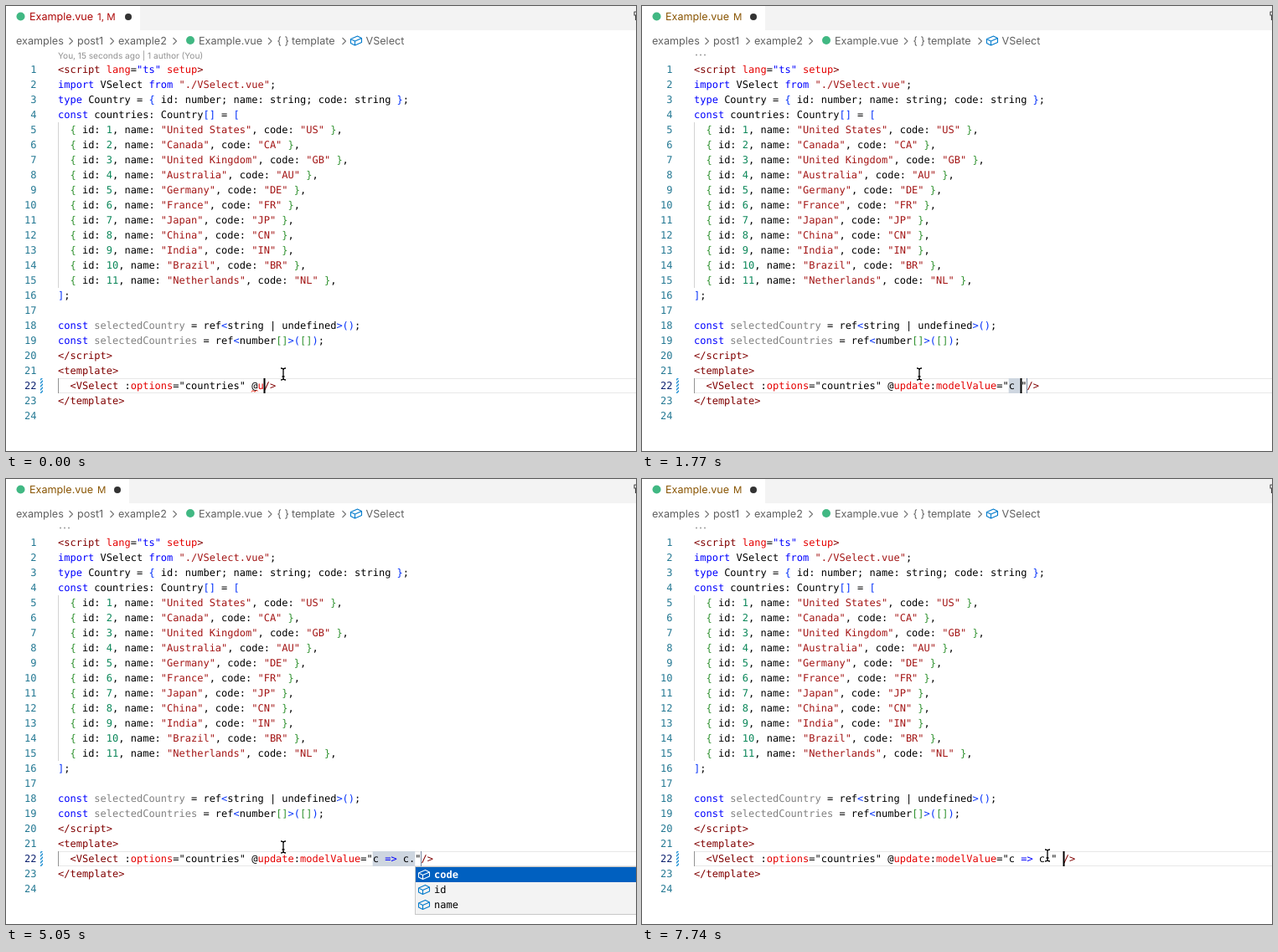
Write an HTML page that moves like this. It is 752 by 532 pixels and loops after 8000 ms.

```html
<!DOCTYPE html>
<html lang="en">
<head>
<meta charset="utf-8">
<title>Code editor</title>
<style>
  html, body { margin: 0; width: 100%; height: 100%; overflow: hidden; background: #fff; }
  svg { display: block; }
  text { white-space: pre; text-rendering: geometricPrecision; }
  .code { font: 12px "DejaVu Sans Mono", monospace; fill: #000; }
  .ui { font: 12.6px Inter, sans-serif; fill: #616161; }
  .lens { font-size: 10.1px; fill: #919191; }
  .badge { font-size: 11.5px; }
  .number { fill: #237893; text-anchor: end; }
  .current { fill: #0b216f; }
  .k { fill: #0000ff; }
  .s { fill: #a31515; }
  .n { fill: #098658; }
  .t { fill: #800000; }
  .a { fill: #e50000; }
  .b { fill: #0431fa; }
  .g { fill: #319331; }
  .u { fill: #808080; }
  .h { fill: #0066bf; font-weight: bold; }
  .chosen { fill: #fff; font-weight: bold; }
  .chosen .h { fill: #9dddff; }
  .line { fill: none; stroke: currentColor; stroke-width: 1.1; stroke-linejoin: round; }
</style>
</head>
<body>
<svg width="752" height="532" viewBox="0 0 752 532">
  <defs>
    <pattern id="hatch" width="4" height="4" patternUnits="userSpaceOnUse">
      <path d="M-1 1L1 -1M0 4L4 0M3 5L5 3" stroke="#2090d3" stroke-width="1.5"/>
    </pattern>
    <g id="cube" class="line"><path d="M-6.5 -2L1.5 -5.5L6.5 -3V2L-1.5 5.5L-6.5 3ZM-6.5 -2L-1.5 .5L6.5 -3M-1.5 .5V5.5"/></g>
    <g id="bolt" class="line"><path d="M-1 -6H4L1.5 -1.5H4.5L-3 6L-1 1H-4Z"/></g>
    <path id="chevron" class="line" d="M-2 -4L2 0L-2 4"/>
    <path id="beam" d="M-3 -7Q0 -7 0 -5Q0 -7 3 -7M0 -5V5M-3 7Q0 7 0 5Q0 7 3 7M-1.5 3H1.5" fill="none"/>
  </defs>
  <g id="fixed"></g>
  <g id="live"></g>
</svg>
<script>
const LOOP = 8000;
const LEFT = 62;
const ADVANCE = 7.2246;
const ROW = 18;
const VALUE_COL = 52;
const EDIT_TOP = 445;

const colX = col => LEFT + col * ADVANCE;
const escape = s => s.replace(/&/g, "&amp;").replace(/</g, "&lt;").replace(/>/g, "&gt;");
// "~kword~" colours "word" with class k
const paint = s => escape(s).replace(/~(\w)(.*?)~/g, '<tspan class="$1">$2</tspan>');
const text = (x, y, s, cls = "code") => `<text x="${x}" y="${y}" class="${cls}">${paint(s)}</text>`;
const rect = (x, y, w, h, fill, extra = "") =>
  `<rect x="${x}" y="${y}" width="${w}" height="${h}" fill="${fill}" ${extra}/>`;
const icon = (id, x, y, color) => `<use href="#${id}" x="${x}" y="${y}" color="${color}"/>`;
const dot = (x, y, r, fill) => `<circle cx="${x}" cy="${y}" r="${r}" fill="${fill}"/>`;

const countries = ("United States:US,Canada:CA,United Kingdom:GB,Australia:AU,Germany:DE,France:FR," +
  "Japan:JP,China:CN,India:IN,Brazil:BR,Netherlands:NL").split(",").map((entry, i) => {
  const [name, code] = entry.split(":");
  return `  ~g{~ id: ~n${i + 1}~, name: ~s"${name}"~, code: ~s"${code}"~ ~g}~,`;
});

const lines = [
  '~t<script~ ~alang~=~k"ts"~ ~asetup~~t>~',
  '~kimport~ VSelect ~kfrom~ ~s"./VSelect.vue"~;',
  "~ktype~ Country = ~b{~ id: number; name: string; code: string ~b}~;",
  "~kconst~ countries: Country~b[]~ = ~b[~",
  ...countries,
  "~b]~;",
  "",
  "~kconst~ ~uselectedCountry~ = ref~b<~string | undefined~b>()~;",
  "~kconst~ ~uselectedCountries~ = ref~b<~number~g[]~~b>(~~g[]~~b)~;",
  "~t<\/script>~",
  "~t<template>~",
  "",
  "~t</template>~",
  ""
];

function drawFixed() {
  const crumbs = [[12, "examples"], [85, "post1"], [134, "example2"], [230, "Example.vue"],
    [323.5, "{ }"], [341, "template"], [429.5, "VSelect"]];
  return crumbs.map(([x, s]) => text(x, 46, s, "ui")).join("") +
    [77.5, 126.5, 201.5, 315, 403.5].map(x => icon("chevron", x, 42, "#767676")).join("") +
    dot(220, 41, 5, "#41b883") +
    icon("cube", 418, 41.5, "#007acc") +
    rect(LEFT, 139, 1, 11 * ROW, "#d3d3d3") +
    rect(LEFT, EDIT_TOP, 700, 1, "#e8e8e8") + rect(LEFT, EDIT_TOP + 17, 700, 1, "#e8e8e8") +
    rect(LEFT, EDIT_TOP, 1, ROW, "#939393") +
    rect(41, EDIT_TOP, 3, ROW, "url(#hatch)") +
    lines.map((s, i) => {
      const y = 80 + i * ROW;
      return text(36.5, y, String(i + 1), "code number" + (i === 21 ? " current" : "")) + text(LEFT, y, s);
    }).join("");
}

const events = { x: 316, w: 431, icon: "bolt", color: "#d67e00",
  rows: ["~h@up~date:modelValue", "~h@~vnode~hUp~dated", "~h@~vnodeBefore~hUp~date"] };
const members = { x: 489, w: 300, icon: "cube", color: "#007acc", rows: ["code", "id", "name"] };

const value = (v, tail = "|\"") => ({ typed: `@update:modelValue="${v}${tail}`, caret: true });
const mouse = (x, y) => ({ mouse: [x, y] });

// Each step overrides the fields that change; "|" marks the caret.
const steps = [
  [0, { typed: "@u|", caret: true, error: true, lens: true, wave: [32, 33], popup: null,
        tip: false, snippet: false, ...mouse(331, 440) }],
  [140, { typed: "@up|" }],
  [290, { popup: events, wave: [32, 35] }],
  [740, { ...value(""), popup: null, wave: null, snippet: true }],
  [880, { error: false, lens: false }],
  [1330, { caret: false }],
  [1470, value("c")],
  [1770, value("c ")],
  [1920, value("c =")],
  [2070, value("c =>")],
  [2210, value("c => ")],
  [2360, { error: true, wave: [52, 53] }],
  [2660, value("c => c")],
  [3110, { caret: false }],
  [3550, value("c => c.")],
  [3700, { popup: members }],
  [4000, { caret: false }],
  [4150, { error: false, wave: null }],
  [4450, { caret: true }],
  [5050, { caret: false }],
  [5500, { caret: true }],
  [5950, { caret: false }],
  [6250, mouse(372, 433)],
  [6400, mouse(440, 436)],
  [6550, { caret: true, ...mouse(478, 446) }],
  [6700, mouse(484, 450)],
  [7000, { caret: false, tip: true }],
  [7140, { ...value("c => c.", "\"|"), popup: null, tip: false, snippet: false }],
  [7740, value("c => c.", "\" |")]
];

let last = {};
const states = steps.map(([at, change]) => last = { ...last, ...change, at });

function drawTab({ error }) {
  const width = error ? 160 : 147;
  const style = `style="fill:${error ? "#ad0707" : "#895503"}"`;
  return rect(width, 0, 752 - width, 29, "#f3f3f3") +
    dot(17.5, 12.5, 5, "#41b883") +
    `<g><text x="28" y="17" class="ui" ${style}>Example.vue</text>` +
    `<text x="109" y="17" class="ui badge" ${style}>${error ? "1, M" : "M"}</text></g>` +
    dot(width - 14, 13, 4, "#333") +
    '<path class="line" color="#424242" d="M753 7H750V11H753M751.5 11V17"/>';
}

function drawLens({ lens }) {
  return lens
    ? text(LEFT, 63, "You, 15 seconds ago | 1 author (You)", "ui lens")
    : [65, 70, 75].map(x => dot(x, 58.5, 0.9, "#919191")).join("");
}

function drawWave([from, to]) {
  const start = colX(from);
  const count = Math.round((colX(to) - start) / 2.5);
  return `<path d="M${start} 461.5q1.25 -3 2.5 -1.2${"t2.5 0".repeat(count - 1)}" fill="none" stroke="#e51400"/>`;
}

function drawEdit({ typed, caret, wave, snippet }) {
  const plain = typed.replace("|", "");
  const split = (plain + "=").indexOf("=");
  const name = plain.slice(0, split).replace(/\w+/g, "~a$&~");
  const rest = plain.slice(split).replace("=>", "~k=>~");
  const end = 32 + plain.length;
  let out = "";
  if (snippet) {
    const x = colX(VALUE_COL);
    out += rect(x, EDIT_TOP, colX(end - 1) - x, ROW, "#ced6e0") +
      rect(Math.round(colX(end)), EDIT_TOP, 1, ROW, "#7787a0");
  }
  out += text(LEFT, 458, `  ~t<VSelect~ :~aoptions~="countries" ${name}${rest}~t/>~`);
  if (wave) out += drawWave(wave);
  if (caret) out += rect(Math.round(colX(32 + typed.indexOf("|"))) - 0.5, EDIT_TOP, 2, ROW, "#000");
  return out;
}

function drawPopup(p) {
  return rect(p.x - 0.5, 463.5, p.w, 57, "#f3f3f3", 'stroke="#c8c8c8"') +
    rect(p.x, 464, p.w - 1, ROW, "#0060c0") +
    p.rows.map((s, i) =>
      icon(p.icon, p.x + 10, 473 + i * ROW, i ? p.color : "#fff") +
      text(p.x + 22, 477 + i * ROW, s, i ? "code" : "code chosen")).join("");
}

const drawTip = () =>
  rect(474.5, 415.5, 178, 28, "#f3f3f3", 'rx="2" stroke="#d4d4d4"') +
  text(483.5, 433, "(parameter) c: Country", "code u");

const drawMouse = ([x, y]) =>
  `<use href="#beam" x="${x}" y="${y}" stroke="#fff" stroke-width="3"/>` +
  `<use href="#beam" x="${x}" y="${y}" stroke="#000" stroke-width="1.3"/>`;

const live = document.getElementById("live");
document.getElementById("fixed").innerHTML = drawFixed();
let shown = null;

function render() {
  const time = performance.now() % LOOP;
  const state = states.findLast(s => s.at <= time);
  if (state !== shown) {
    shown = state;
    live.innerHTML = drawTab(state) + drawLens(state) + drawEdit(state) +
      (state.popup ? drawPopup(state.popup) : "") +
      (state.tip ? drawTip() : "") + drawMouse(state.mouse);
  }
  requestAnimationFrame(render);
}
render();
</script>
</body>
</html>
```
